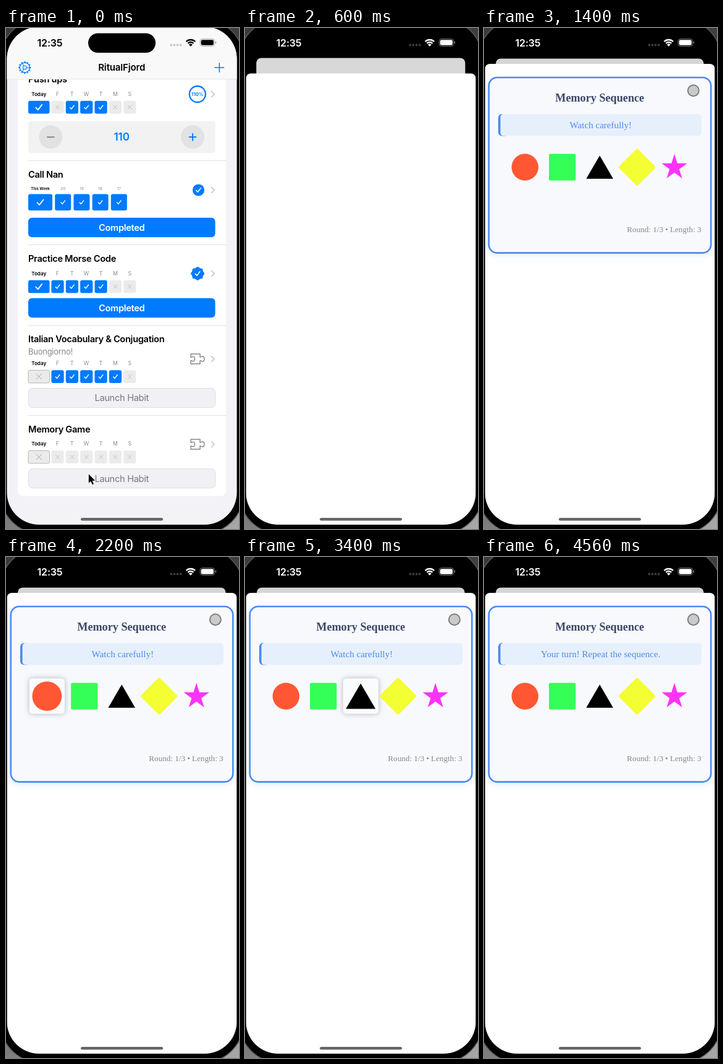
An HTML page with a canvas that plays this animation: 377 by 810 pixels, repeating every 4920 ms.

```html
<!DOCTYPE html>
<html lang="en">
<head>
<meta charset="utf-8">
<title>Habit tracker</title>
<style>
html, body { margin: 0; width: 100%; height: 100%; overflow: hidden; background: #000; }
canvas { display: block; width: 377px; height: 810px; }
</style>
</head>
<body>
<canvas id="stage"></canvas>
<script>
const W = 377, H = 810, LOOP = 4920;
const BLUE = '#007aff', GRAY = '#8a8a8e', SANS = 'Inter, Roboto, sans-serif';
const SERIF = '"Liberation Serif", "Noto Serif", serif';
const canvas = document.getElementById('stage');
const ctx = canvas.getContext('2d');
const dpr = window.devicePixelRatio || 1;
canvas.width = W * dpr;
canvas.height = H * dpr;

// ---- drawing helpers ----
function box(x, y, w, h, r, fill, stroke, lw = 1) {
  ctx.beginPath();
  ctx.roundRect(x, y, w, h, r);
  paint(fill, stroke, lw);
}

function disc(x, y, r, fill, stroke, lw = 1) {
  ctx.beginPath();
  ctx.arc(x, y, r, 0, Math.PI * 2);
  paint(fill, stroke, lw);
}

function paint(fill, stroke, lw) {
  if (fill) { ctx.fillStyle = fill; ctx.fill(); }
  if (stroke) { ctx.strokeStyle = stroke; ctx.lineWidth = lw; ctx.stroke(); }
}

function poly(points, fill, stroke, lw) {
  ctx.beginPath();
  points.forEach(([x, y]) => ctx.lineTo(x, y));
  ctx.closePath();
  paint(fill, stroke, lw);
}

function line(points, color, lw) {
  ctx.beginPath();
  points.forEach(([x, y]) => ctx.lineTo(x, y));
  ctx.lineCap = ctx.lineJoin = 'round';
  paint(null, color, lw);
}

function text(str, x, y, size, color, { weight = 400, align = 'center', font = SANS, track = 0 } = {}) {
  ctx.font = `${weight} ${size}px ${font}`;
  ctx.letterSpacing = `${track * size}px`;
  ctx.textAlign = align;
  ctx.fillStyle = color;
  ctx.fillText(str, x, y);
}

function check(x, y, s, color = '#fff', lw = 1.5) {
  line([[x - s, y + s * 0.1], [x - s * 0.3, y + s * 0.85], [x + s, y - s * 0.85]], color, lw);
}

function cross(x, y, s, color) {
  line([[x - s, y - s], [x + s, y + s]], color, 1);
  line([[x - s, y + s], [x + s, y - s]], color, 1);
}

function plus(x, y, s, color, lw) {
  line([[x - s, y], [x + s, y]], color, lw);
  line([[x, y - s], [x, y + s]], color, lw);
}

// ---- icons ----
function gear(x, y, color) {
  disc(x, y, 8, null, color, 1.3);
  disc(x, y, 3, null, color, 1.1);
  for (let i = 0; i < 12; i++) {
    const a = i * Math.PI / 6, c = Math.cos(a), s = Math.sin(a);
    line([[x + c * 8.6, y + s * 8.6], [x + c * 9.4, y + s * 9.4]], color, 1.8);
    if (i % 4 === 0) line([[x + c * 3, y + s * 3], [x + c * 8, y + s * 8]], color, 1.1);
  }
}

function seal(x, y) {
  const pts = Array.from({ length: 16 }, (_, i) => {
    const a = i * Math.PI / 8, r = i % 2 ? 8.8 : 10.4;
    return [x + r * Math.cos(a), y + r * Math.sin(a)];
  });
  ctx.lineJoin = 'round';
  poly(pts, BLUE, BLUE, 1.5);
  check(x, y, 3.8);
}

function puzzle(x, y) {
  const l = x - 10, r = x + 5, t = y - 8, b = y + 8;
  ctx.beginPath();
  ctx.moveTo(l, y - 3);
  ctx.lineTo(l, t);
  ctx.lineTo(r, t);
  ctx.lineTo(r, y - 3);
  ctx.bezierCurveTo(r + 2, y - 2, r + 3, y - 5, r + 5, y - 4);
  ctx.bezierCurveTo(r + 7.5, y - 2.5, r + 7.5, y + 2.5, r + 5, y + 4);
  ctx.bezierCurveTo(r + 3, y + 5, r + 2, y + 2, r, y + 3);
  ctx.lineTo(r, b);
  ctx.lineTo(l, b);
  ctx.lineTo(l, y + 3);
  ctx.bezierCurveTo(l + 2, y + 2, l + 3, y + 5, l + 5, y + 3.5);
  ctx.bezierCurveTo(l + 7, y + 2, l + 7, y - 2, l + 5, y - 3.5);
  ctx.bezierCurveTo(l + 3, y - 5, l + 2, y - 2, l, y - 3);
  ctx.closePath();
  ctx.lineJoin = 'round';
  paint(null, '#88888c', 1.5);
}

function chevron(y) {
  line([[332.5, y - 4.5], [337, y], [332.5, y + 4.5]], '#c0c0c4', 1.5);
}

function pointer(x, y) {
  const p = [[0, 0], [0, 14.5], [3.4, 11.4], [5.8, 17], [8.2, 16], [5.8, 10.6], [10.3, 10.4]];
  ctx.lineJoin = 'round';
  poly(p.map(([a, b]) => [x + a, y + b]), '#000', '#fff', 1.6);
  poly(p.map(([a, b]) => [x + a, y + b]), '#000');
}

function statusBar(dark) {
  const ink = dark ? '#fff' : '#000', dim = dark ? '#3c3c3c' : '#c8c8ca';
  box(133, 8.5, 109, 31.5, 15.7, '#000');
  text('12:35', 71, 29.5, 16, ink, { weight: 600, track: -0.01 });
  for (let i = 0; i < 4; i++) disc(267.3 + i * 5.1, 27.5, 1.9, dim);
  ctx.lineCap = 'butt';
  for (const r of [10.3, 6.3]) {
    ctx.beginPath();
    ctx.arc(298.8, 29.3, r, -Math.PI * 0.75, -Math.PI * 0.25);
    paint(null, ink, 2.4);
  }
  ctx.beginPath();
  ctx.moveTo(298.8, 29.8);
  ctx.arc(298.8, 29.8, 4, -Math.PI * 0.75, -Math.PI * 0.25);
  paint(ink);
  box(314, 17.6, 23.5, 11.8, 3.8, null, dark ? '#777' : '#a5a5a7', 1);
  box(315.6, 19.2, 20.3, 8.6, 2.4, ink);
  box(338.7, 21.5, 1.4, 4, 0.7, dark ? '#777' : '#a5a5a7');
}

// ---- habit list ----
const TITLE = { weight: 600, align: 'left', track: -0.02 };

function cell(x, y, w, h, done, first) {
  const cx = x + w / 2, cy = y + h / 2;
  if (done) {
    box(x, y, w, h, 3, BLUE);
    check(cx, cy, first ? 5 : 3.3, '#fff', first ? 1.8 : 1.4);
  } else {
    box(x, y, w, h, 3, '#ebebec', first ? '#b5b5b8' : null);
    cross(cx, cy, first ? 4.2 : 3, first ? '#aaaaad' : '#c3c3c6');
  }
}

// marks: one character per day, 1 = done
function days(y, marks) {
  text('Today', 53.2, y - 8, 8.1, '#000', { weight: 600 });
  cell(36, y, 34.5, 20.6, marks[0] === '1', true);
  [...'FTWTMS'].forEach((d, i) => {
    const x = 73.4 + i * 23.35;
    text(d, x + 10, y - 8, 8.6, GRAY);
    cell(x, y, 20.2, 20.6, marks[i + 1] === '1');
  });
}

function weeks(y) {
  text('This Week', 55.5, y - 6.5, 6, '#000', { weight: 600 });
  cell(36, y, 39, 26.5, true, true);
  for (let i = 0; i < 4; i++) {
    const x = 79.2 + i * 30.2;
    text(20 - i, x + 13, y - 6.5, 6.3, GRAY);
    cell(x, y, 26, 26.5, true);
  }
}

function button(y, label, alpha = 1) {
  const done = label === 'Completed';
  ctx.globalAlpha = alpha;
  if (done) box(36, y, 302.5, 31.5, 6, BLUE);
  else box(36.5, y + 0.5, 302, 31, 6, '#f1f1f5', '#dddde2');
  text(label, 187.2, y + 21.2, 14.6, done ? '#fff' : '#77777b', { weight: done ? 600 : 400, track: -0.02 });
  ctx.globalAlpha = 1;
}

function divider(y) {
  ctx.fillStyle = '#e1e1e3';
  ctx.fillRect(36, y, 320, 1);
}

function stepper() {
  box(36, 150.5, 302.5, 51.5, 5, '#f2f2f3');
  disc(72.3, 176.3, 19, '#e2e2e3');
  disc(302, 176.3, 19, '#e2e2e3');
  line([[66.8, 176.3], [77.8, 176.3]], '#7b7b7e', 1.8);
  plus(302, 176.3, 5.4, BLUE, 1.9);
  text('110', 187.2, 182.3, 17, BLUE, { weight: 600 });
}

function habitList(pressed, inactive) {
  const accent = inactive ? '#7d7d81' : BLUE;
  ctx.fillStyle = '#f2f2f7';
  ctx.fillRect(0, -2, W, 806);
  box(19, 40, 337, 716.5, 8, '#fff');

  text('Push ups', 36, 88, 14.6, '#000', TITLE);
  days(117.8, '1011100');
  disc(309.8, 107, 13, null, BLUE, 2.3);
  text('110%', 309.8, 109.8, 7.6, BLUE, { weight: 700 });
  chevron(107);
  stepper();
  divider(214);

  text('Call Nan', 36, 242, 14.6, '#000', TITLE);
  weeks(268.5);
  disc(311.4, 262, 9.6, BLUE);
  check(311.4, 262, 3.8);
  chevron(262);
  button(306.7, 'Completed');
  divider(350);

  text('Practice Morse Code', 36, 378, 14.6, '#000', TITLE);
  days(407.8, '1111100');
  seal(310, 397);
  chevron(397);
  button(436.7, 'Completed');
  divider(480.5);

  text('Italian Vocabulary & Conjugation', 36, 508, 14.6, '#000', TITLE);
  text('Buongiorno!', 36, 528, 13, GRAY, { align: 'left', track: -0.02 });
  days(553.3, '0111110');
  puzzle(309, 535);
  chevron(535);
  button(582, 'Launch Habit');
  divider(626);

  text('Memory Game', 36, 654, 14.6, '#000', TITLE);
  days(683.3, '0000000');
  puzzle(309, 673);
  chevron(673);
  button(712.3, 'Launch Habit', pressed ? 0.45 : 1);

  ctx.fillStyle = '#f9f9f9';
  ctx.fillRect(0, -2, W, 85);
  ctx.fillStyle = '#dcdcde';
  ctx.fillRect(0, 82.5, W, 0.6);
  gear(30.3, 64, accent);
  plus(345.3, 64, 7.2, accent, 1.5);
  text('RitualFjord', 187.2, 69.3, 15, '#000', { weight: 600, track: -0.01 });
}

// ---- memory game ----
const MID = 225;
const shapes = [
  x => disc(x, MID, 21.7, '#ff5733'),
  x => box(x - 21.6, MID - 21.6, 43.2, 43.2, 2.2, '#33ff57'),
  x => poly([[x, MID - 18.7], [x + 21.8, MID + 18.7], [x - 21.8, MID + 18.7]], '#000'),
  x => {
    ctx.translate(x, MID);
    ctx.rotate(Math.PI / 4);
    box(-21.6, -21.6, 43.2, 43.2, 2.2, '#f3ff33');
  },
  x => {
    const half = [[50, 0], [61, 35], [98, 35], [68, 57], [79, 91], [50, 70]];
    const rest = half.slice(1, 5).reverse().map(([a, b]) => [100 - a, b]);
    poly([...half, ...rest].map(([a, b]) => [x + (a - 50) * 0.432, 203.6 + b * 0.432]), '#ff33f6');
  }
];

function shadow(color, blur, y) {
  ctx.shadowColor = color;
  ctx.shadowBlur = blur * dpr;
  ctx.shadowOffsetY = y * dpr;
}

// Which shape is lit, how large it is, and whether its tile shows
function highlight(t) {
  if (t < 2000 || t >= 4200) return { index: -1 };
  if (t >= 4000) return { index: 2, scale: 1.03, tile: false };
  const index = t < 2800 ? 0 : t < 3400 ? 1 : 2;
  return { index, scale: t < 2200 ? 1.06 : 1.1, tile: true };
}

function message(t) {
  if (t < 1400) return 'Round 1: Watch the sequence carefully!';
  return t < 4560 ? 'Watch carefully!' : 'Your turn! Repeat the sequence.';
}

function game(t) {
  const serif = { font: SERIF };
  ctx.save();
  shadow('rgba(74,134,232,0.16)', 12, 4);
  box(7.8, 80, 359.4, 283.6, 13.5, '#f8f9fc');
  ctx.restore();
  box(7.8, 80, 359.4, 283.6, 13.5, null, '#4a8af0', 2.6);
  text('Memory Sequence', 187.2, 118.8, 18.2, '#3b4767', { ...serif, weight: 700 });

  ctx.save();
  ctx.beginPath();
  ctx.roundRect(23, 139, 329, 35.5, 6);
  ctx.clip();
  ctx.fillStyle = '#4a8af0';
  ctx.fillRect(23, 139, 12, 36);
  box(26.6, 139, 330, 35.5, [5, 0, 0, 5], '#e6f0fc');
  ctx.restore();
  text(message(t), 188.8, 162, 15.1, '#4f8be8', serif);

  const lit = highlight(t);
  shapes.forEach((draw, i) => {
    const x = 66.3 + i * 60.45;
    ctx.save();
    if (i === lit.index) {
      if (lit.tile) {
        ctx.save();
        shadow('rgba(0,0,0,0.28)', 8, 0);
        box(x - 28.5, MID - 28.8, 57.2, 57.4, 6, '#fafbfd');
        ctx.restore();
      }
      ctx.translate(x, MID);
      ctx.scale(lit.scale, lit.scale);
      ctx.translate(-x, -MID);
    }
    draw(x);
    ctx.restore();
  });

  text('Round: 1/3 • Length: 3', 351.6, 330.3, 13.1, '#888', { ...serif, align: 'right' });
  disc(338.8, 101.2, 9, '#cacaca', '#7d7d7d', 2);
}

// ---- scenes ----
function listScene(t) {
  const opening = t >= 400;
  ctx.save();
  if (opening) {
    ctx.translate(2.1, 6.7);
    ctx.scale(0.9888, 0.9888);
    ctx.beginPath();
    ctx.roundRect(1.5, -2, 372, 805, 50);
    ctx.clip();
  }
  habitList(t >= 200, opening);
  if (opening) {
    ctx.fillStyle = 'rgba(0,0,0,0.025)';
    ctx.fillRect(0, -2, W, 806);
  }
  ctx.restore();
  statusBar(false);
  if (opening) box(1.5, 708, 372, 130, 8, '#fff');
}

function sheetScene(t) {
  const open = t >= 800;
  statusBar(true);
  if (open) box(19, 49.5, 336.5, 60, 8, '#d5d5d6');
  else box(18.3, 48.5, 338, 60, 8, '#d8d8d9');
  box(1.5, open ? 58 : 73.5, 372, 780, 8, '#fff');
  if (open) game(t);
}

function bezel() {
  const g = ctx.createLinearGradient(0, 0, W, H);
  g.addColorStop(0, '#3a3a3a');
  g.addColorStop(0.6, '#4a4a4a');
  g.addColorStop(1, '#a8a8a8');
  ctx.fillStyle = g;
  ctx.fillRect(0, 0, W, H);
  box(-9, -14, 393, 831, 64, '#000', '#5a5a5a', 1.5);
}

function render(t) {
  ctx.setTransform(dpr, 0, 0, dpr, 0, 0);
  bezel();
  ctx.save();
  ctx.beginPath();
  ctx.roundRect(1.5, -2, 372, 805, 52);
  ctx.clip();
  if (t < 600) listScene(t);
  else sheetScene(t);
  box(121, 792, 133, 4.6, 2.3, '#666');
  ctx.restore();
  if (t < 200) pointer(133.8, 721.3);
  else if (t < 600) pointer(153, 726.3);
}

const start = performance.now();
function tick() {
  render((performance.now() - start) % LOOP);
  requestAnimationFrame(tick);
}
tick();
</script>
</body>
</html>
```
